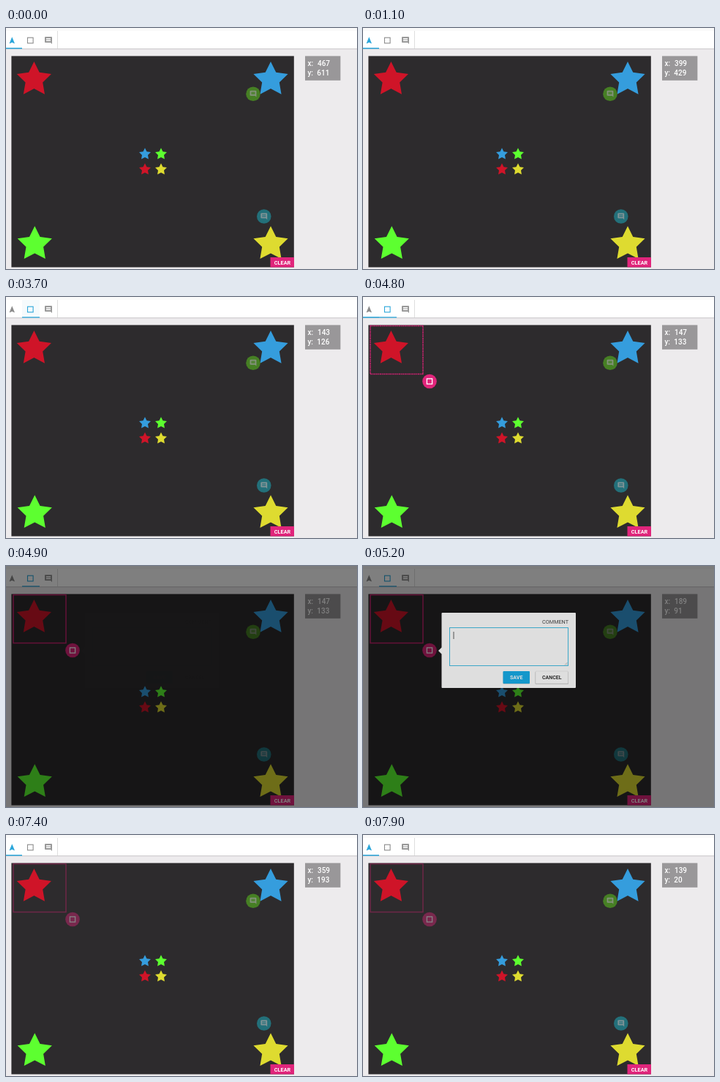
Write an HTML page that moves like this. It is 480 px wide and 330 px high and loops after 8000 ms.

```html
<!DOCTYPE html>
<html lang="en">
<head>
<meta charset="utf-8">
<title>Annotation tool</title>
<style>
  html, body { margin: 0; width: 100%; height: 100%; overflow: hidden; background: #edebed; }
  svg { display: block; width: 480px; height: 330px; font: 7px Roboto, sans-serif; }
  .bold { font-weight: 700; }
  .coords { font-size: 10px; font-weight: 500; fill: #fff; }
</style>
</head>
<body>
<svg viewBox="0 0 480 330">
  <defs>
    <polygon id="star"/>
    <path id="arrow" d="M12 2L4.5 20.3l.7.7L12 18l6.8 3 .7-.7z"/>
    <path id="comment" d="M22 4c0-1.1-.9-2-2-2H4c-1.1 0-2 .9-2 2v12c0 1.1.9 2 2 2h14l4 4zM18 14H6v-2h12zm0-3H6V9h12zm0-3H6V6h12z" fill-rule="evenodd"/>
  </defs>

  <!-- toolbar -->
  <rect width="480" height="4" fill="#fafafa"/>
  <rect y="4" width="480" height="25" fill="#fff"/>
  <rect y="28" width="480" height="1.2" fill="#d0ced0"/>
  <rect x="70" y="4" width="1" height="24" fill="#dedede"/>
  <rect id="tabTint" x="22" y="4" width="24" height="24" fill="#f5fafc"/>
  <rect id="arrowLine" y="27" width="22" height="1.5" fill="#2ba6da"/>
  <rect id="boxLine" x="22" y="27" width="24" height="1.5" fill="#4bb4e0"/>
  <use id="arrowIcon" href="#arrow" transform="translate(2.5 11.2) scale(.48)"/>
  <rect id="boxIcon" x="29.5" y="13.2" width="7.6" height="7.6" fill="none" stroke-width="1.1"/>
  <use href="#comment" transform="translate(52 11) scale(.5)" fill="#999"/>

  <!-- stage -->
  <rect x="7.4" y="38.4" width="386.4" height="289.2" fill="#2d2b2d"/>
  <g id="stars"></g>
  <g transform="translate(338 90.2)">
    <circle r="9.8" fill="#467f24"/>
    <use href="#comment" transform="translate(-5.3 -5.3) scale(.44)" fill="#84927d"/>
  </g>
  <g transform="translate(352.8 258)">
    <circle r="9.8" fill="#23707a"/>
    <use href="#comment" transform="translate(-5.3 -5.3) scale(.44)" fill="#829497"/>
  </g>
  <rect id="region" fill="none" stroke="#c9236f" stroke-width="1.5"/>
  <g id="marker" transform="translate(91 115.5)">
    <circle r="9.8" fill="#e0257b"/>
    <rect x="-3.6" y="-3.6" width="7.2" height="7.2" fill="none" stroke="#fff" stroke-width="1.3"/>
  </g>
  <rect x="361.5" y="314" width="32.5" height="13.6" fill="#e0257b"/>
  <text class="bold" x="378" y="323.6" font-size="7.3" text-anchor="middle" fill="#fff">CLEAR</text>

  <!-- pointer position -->
  <rect x="409" y="38.4" width="48.4" height="33.4" fill="#999799"/>
  <g class="coords">
    <text x="412.5" y="52">x:</text><text id="px" x="426" y="52"/>
    <text x="412.5" y="65">y:</text><text id="py" x="425.3" y="65"/>
  </g>

  <rect id="shade" width="480" height="330" opacity=".5"/>
  <g id="dialog">
    <path d="M108.5 64H290q1 0 1 1V166q0 1-1 1H108.5q-1 0-1-1V120.5L103 116l4.5-4.5V65q0-1 1-1Z" fill="#fff"/>
    <text x="281" y="79.3" text-anchor="end" font-size="7.25" fill="#444">COMMENT</text>
    <rect x="118.5" y="84.5" width="162" height="52" fill="#fff" stroke="#43bfe6"/>
    <path d="M276 135.5l3.5-3.5M278 135.5l1.5-1.5" stroke="#999" stroke-width=".6"/>
    <text id="typed" x="123.5" y="97.7" font-size="7.7" fill="#333"/>
    <rect id="caret" y="90" width=".8" height="10" fill="#333"/>
    <rect x="191.5" y="144.8" width="36.5" height="17" rx="1" opacity=".2"/>
    <rect x="191.5" y="144" width="36.5" height="17" rx="1" fill="#14ade9"/>
    <text class="bold" x="209.7" y="155" text-anchor="middle" fill="#fff">SAVE</text>
    <rect x="235.5" y="144.8" width="45.5" height="17" rx="1" opacity=".25"/>
    <rect x="236" y="144" width="44.5" height="17" rx="1" fill="#fff" stroke="#ddd" stroke-width=".5"/>
    <text class="bold" x="258.2" y="155" text-anchor="middle" fill="#333">CANCEL</text>
  </g>
</svg>
<script>
const LOOP = 8000;
const TAB_CLICK = 3000, DRAG = [4100, 4650], OPEN = 4900, SAVE = 7000;
const KEYS = [5950, 6100, 6300, 6450];
const BLUE = '#2ba6da', GREY = '#8c8c8c';

// time, x, y of the last reported pointer position
const POINTER = [
  [100, 467, 611], [700, 399, 429], [2300, 399, 429], [2850, 76, 6],
  [3300, 76, 6], [3700, 143, 126], [4000, 147, 133], [4900, 147, 133],
  [5150, 189, 91], [6500, 189, 91], [6501, 436, 300], [6700, 425, 287],
  [6850, 418, 262], [7250, 400, 226], [7850, 139, 20]
];

const el = {};
document.querySelectorAll('[id]').forEach(node => el[node.id] = node);
const set = (node, attrs) => {
  for (const name in attrs) node.setAttribute(name, attrs[name]);
};
const show = (node, visible) => node.style.display = visible ? '' : 'none';
const progress = (t, from, to) => Math.min(1, Math.max(0, (t - from) / (to - from)));
const ease = p => p * p * (3 - 2 * p);
const mix = (a, b, p) => a + (b - a) * p;

set(el.star, { points: Array.from({ length: 10 }, (_, i) => {
  const r = i % 2 ? 0.5 : 1, a = i * Math.PI / 5;
  return [r * Math.sin(a), -r * Math.cos(a)].map(v => v.toFixed(4));
}).join(' ') });

const red = '#cf1428', sky = '#359ddd', green = '#5dff30', yellow = '#dedb30';
el.stars.innerHTML = [
  [38.4, 70.7, 24.8, red], [362, 70.7, 24.8, sky],
  [39.3, 296, 24.8, green], [362, 296, 24.8, yellow],
  [190, 172.7, 8.4, sky], [212, 172.7, 8.4, green],
  [190, 193.7, 8.4, red], [212, 193.7, 8.4, yellow]
].map(([x, y, r, fill]) =>
  `<use href="#star" transform="translate(${x} ${y}) scale(${r})" fill="${fill}"/>`).join('');

function pointerAt(t) {
  const next = POINTER.findIndex(key => key[0] > t);
  if (next === 0) return POINTER[0].slice(1);
  if (next < 0) return POINTER[POINTER.length - 1].slice(1);
  const [t0, x0, y0] = POINTER[next - 1], [t1, x1, y1] = POINTER[next];
  const p = ease(progress(t, t0, t1));
  return [mix(x0, x1, p), mix(y0, y1, p)];
}

function drawToolbar(t) {
  const boxActive = t >= TAB_CLICK && t < SAVE;
  show(el.boxLine, boxActive);
  show(el.arrowLine, !boxActive || (t >= DRAG[1] && t < OPEN));
  set(el.arrowIcon, { fill: boxActive ? GREY : BLUE });
  set(el.boxIcon, { stroke: boxActive ? BLUE : GREY });
  set(el.tabTint, { opacity: progress(t, 2850, 3050) * (1 - progress(t, 3700, 4100)) });
}

function drawRegion(t) {
  const p = ease(progress(t, ...DRAG));
  const x = mix(82, 10, p), y = mix(105.5, 39.5, p);
  const opacity = mix(1, 0.42, progress(t, SAVE, SAVE + 300));
  show(el.region, t > DRAG[0]);
  set(el.region, {
    x, y, width: 82 - x, height: 105.5 - y, opacity,
    'stroke-dasharray': t < OPEN ? '2 .6' : 'none'
  });
  show(el.marker, t >= DRAG[1]);
  set(el.marker, { opacity });
}

function drawDialog(t) {
  const opacity = progress(t, OPEN, OPEN + 350) * (1 - progress(t, SAVE, SAVE + 200));
  show(el.shade, t >= OPEN && t < SAVE);
  show(el.dialog, opacity > 0);
  set(el.dialog, { opacity });
  const count = KEYS.filter(key => t >= key).length;
  el.typed.textContent = 'test'.slice(0, count);
  set(el.caret, { x: 123.6 + (count && opacity ? el.typed.getComputedTextLength() : 0) });
  const sinceKey = t - (count ? KEYS[count - 1] : OPEN);
  show(el.caret, sinceKey % 1000 < 500);
}

function frame(now) {
  const t = now % LOOP;
  const [x, y] = pointerAt(t);
  el.px.textContent = Math.round(x);
  el.py.textContent = Math.round(y);
  drawToolbar(t);
  drawRegion(t);
  drawDialog(t);
}

const start = performance.now();
function tick() {
  frame(performance.now() - start);
  requestAnimationFrame(tick);
}
tick();
</script>
</body>
</html>
```
